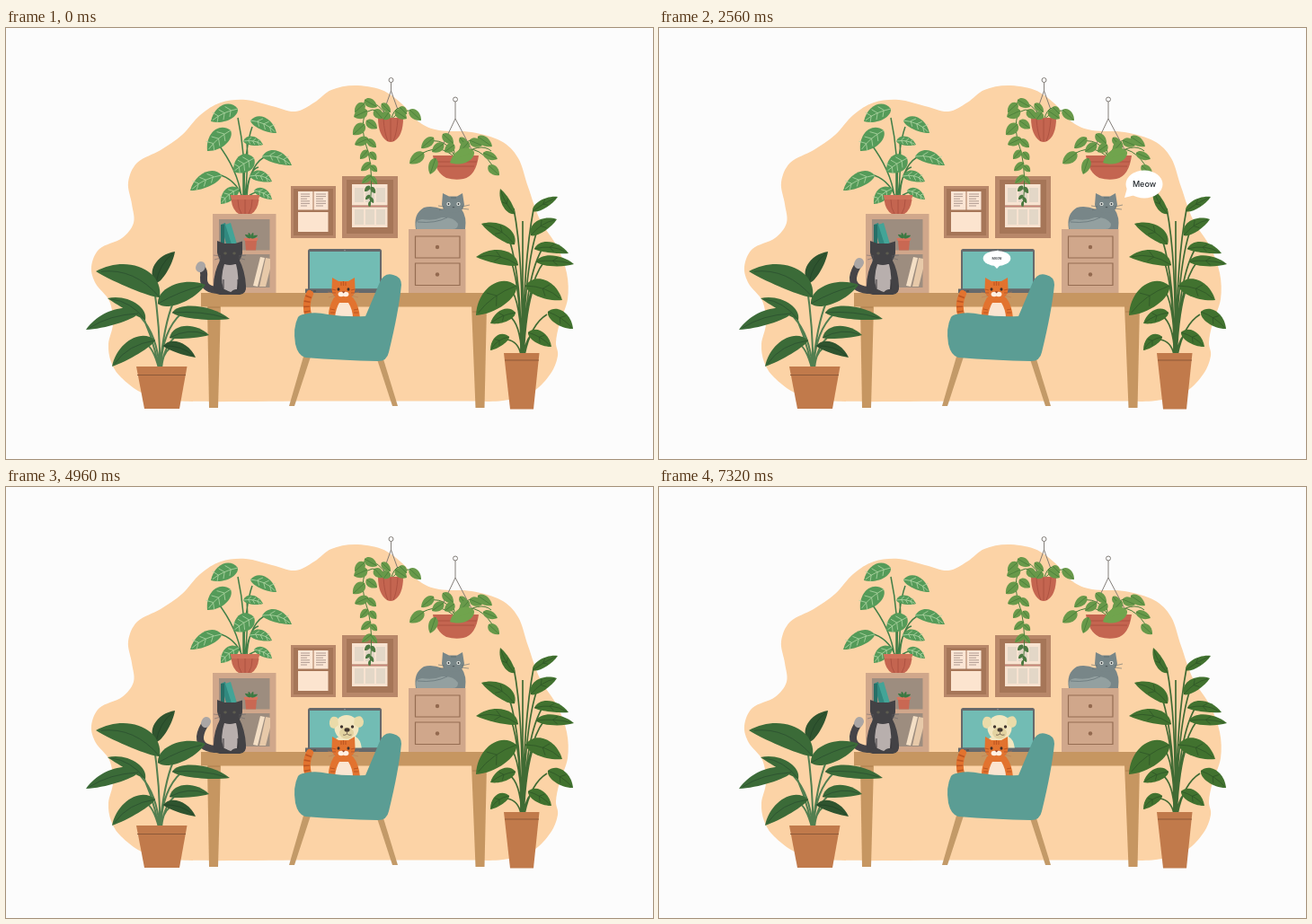
An HTML page with a canvas that plays this animation: 720x480 px, repeating every 8 s.

```html
<!DOCTYPE html>
<html lang="en">
<head>
<meta charset="utf-8">
<title>Cats at the desk</title>
<style>
html, body { margin: 0; width: 100%; height: 100%; overflow: hidden; background: #fcfcfc; }
canvas { display: block; }
</style>
</head>
<body>
<canvas id="stage" width="720" height="480"></canvas>
<script>
const ctx = document.getElementById('stage').getContext('2d');
const LOOP = 8000;
const clamp = v => Math.max(0, Math.min(1, v));
const mix = (a, b, k) => a + (b - a) * k;
const easeInOut = p => p * p * (3 - 2 * p);
const backOut = p => 1 + 2.70158 * (p - 1) ** 3 + 1.70158 * (p - 1) ** 2;

function fill(d, color) {
  ctx.fillStyle = color;
  ctx.fill(new Path2D(d));
}
function line(d, color, width = 1) {
  ctx.strokeStyle = color;
  ctx.lineWidth = width;
  ctx.stroke(new Path2D(d));
}
function rect(x, y, w, h, color) {
  ctx.fillStyle = color;
  ctx.fillRect(x, y, w, h);
}
function oval(x, y, rx, ry, color, turn = 0) {
  ctx.fillStyle = color;
  ctx.beginPath();
  ctx.ellipse(x, y, rx, ry, turn, 0, 7);
  ctx.fill();
}

// Closed Catmull-Rom curve through points.
function smooth(points, color) {
  const n = points.length;
  const at = i => points[(i + n) % n];
  ctx.beginPath();
  ctx.moveTo(...at(0));
  for (let i = 0; i < n; i++) {
    const [a, b, c, d] = [at(i - 1), at(i), at(i + 1), at(i + 2)];
    ctx.bezierCurveTo(b[0] + (c[0] - a[0]) / 6, b[1] + (c[1] - a[1]) / 6,
      c[0] - (d[0] - b[0]) / 6, c[1] - (d[1] - b[1]) / 6, c[0], c[1]);
  }
  ctx.fillStyle = color;
  ctx.fill();
}

// Leaf from base to tip; w is the half width, bend bows it sideways.
function leaf([x0, y0, x1, y1, w, bend = 0], color, vein, ribs = 0) {
  const dx = x1 - x0, dy = y1 - y0, len = Math.hypot(dx, dy);
  const at = (along, side) =>
    [x0 + dx * along - dy / len * side, y0 + dy * along + dx / len * side];
  const edge = 1.33;
  ctx.beginPath();
  ctx.moveTo(x0, y0);
  ctx.bezierCurveTo(...at(.1, (bend + w) * edge), ...at(.68, (bend + w) * edge), x1, y1);
  ctx.bezierCurveTo(...at(.68, (bend - w) * edge), ...at(.1, (bend - w) * edge), x0, y0);
  ctx.fillStyle = color;
  ctx.fill();
  ctx.beginPath();
  ctx.moveTo(x0, y0);
  ctx.quadraticCurveTo(...at(.5, bend * 2), ...at(.93, bend * .2));
  for (let i = 1; i <= ribs; i++) {
    const p = i / (ribs + 1.3);
    for (const s of [-1, 1]) {
      ctx.moveTo(...at(p, bend));
      ctx.lineTo(...at(p + .13, bend + s * w * .7));
    }
  }
  ctx.strokeStyle = vein;
  ctx.lineWidth = .8;
  ctx.stroke();
}
const leaves = (rows, color, vein, ribs) => rows.forEach(r => leaf(r, color, vein, ribs));

function backdrop() {
  rect(0, 0, 720, 480, '#fcfcfc');
  smooth([[95, 266], [104, 246], [129, 234], [142, 217], [140, 196], [136, 172], [146, 150],
    [172, 136], [196, 119], [216, 97], [239, 83], [267, 80], [296, 87], [322, 93], [343, 83],
    [362, 69], [388, 64], [418, 69], [440, 84], [460, 105], [482, 114], [518, 116], [551, 126],
    [570, 145], [581, 177], [594, 213], [613, 243], [624, 273], [625, 302], [616, 329],
    [612, 350], [614, 365], [606, 385], [586, 405], [553, 415], [500, 415.5], [350, 415.5],
    [190, 415.5], [153, 407], [128, 389], [117, 372], [114, 352], [119, 329], [115, 304],
    [100, 285]], '#fcd3a6');
}

function pictures() {
  rect(317, 176, 50, 58, '#b88769');
  rect(320, 179, 44, 52, '#a67658');
  rect(325, 182, 16.5, 20.5, '#fbe6d5');
  rect(342.5, 182, 16, 20.5, '#fbe6d5');
  rect(325, 205, 33.5, 22, '#fce4cf');
  for (let i = 0; i < 6; i++) {
    const y = 185 + i * 2.6, short = i % 3 == 2 ? 3 : 0;
    line(`M328 ${y}h${10 - short}M345 ${y}h${11 - short}`, '#9d8a80', .8);
  }
  rect(374, 165, 62, 69, '#b88769');
  rect(379, 169, 52, 60, '#a67658');
  rect(385, 174, 39.5, 23.5, '#f8e3d1');
  rect(385, 199.5, 39.5, 22.5, '#f8e3d1');
  line('M385 198.5h40', '#c9837a', 1);
  for (let i = 0; i < 3; i++) {
    rect(388 + i * 12, 178, 10, 16, '#e3d7c7');
    rect(388 + i * 12, 202, 10, 17, '#e3d7c7');
  }
}

function furniture() {
  rect(230, 207, 70.5, 88, '#d0a78b');
  rect(237, 213, 56.5, 34.5, '#9d8d7f');
  rect(237, 252, 56.5, 37, '#9d8d7f');
  fill('M239 219l5-2 9 28-6 2z', '#31897f');
  fill('M244 219l6-2 8 27-5 3z', '#43a497');
  rect(239, 219, 4, 28, '#287067');
  fill('M264.5 234h16l-1 3h-14z', '#d9735c');
  fill('M266 237h13l-1 10.500h-11z', '#c96853');
  leaves([[272, 234, 266, 230, 1.5], [272, 234, 270, 228, 1.5], [273, 234, 275, 228, 1.5],
    [273, 234, 280, 231, 1.5]], '#3d7943', '#3d7943');
  fill('M283 255l5 1-8 32-5-1z', '#f4dfc5');
  fill('M289 256l5 1v11l-5 20h-7z', '#e7c9a9');

  rect(448, 224, 63.5, 71, '#d0a78b');
  line('M455.500 232h49.500v24h-49.500zM455.500 262h49.500v24.500h-49.500z', '#966d52', 1.2);
  oval(480, 244, 2.2, 2.2, '#93694f');
  oval(480, 274.500, 2.2, 2.2, '#93694f');
}

function desk() {
  fill('M224 309h15l-3 114h-10z', '#c69661');
  fill('M518 309h17l-2.500 114h-10z', '#c69661');
  rect(217, 295, 319, 15.500, '#c69661');
  line('M225 311h13M519 316h15', '#ad7f4d', 1);
}

function laptop() {
  ctx.fillStyle = '#66696b';
  ctx.beginPath();
  ctx.roundRect(336, 246, 82, 47, 2.500);
  ctx.fill();
  rect(338, 249, 78, 41.500, '#72bcb4');
  oval(377, 247.600, .6, .6, '#b4bcbc');
  rect(333, 290.500, 85, 4.500, '#66696b');
  line('M336 293h5M342 293h3', '#404445', 1);
}

function dog(rise) {
  if (rise <= 0) return;
  ctx.save();
  ctx.beginPath();
  ctx.rect(338, 249, 78, 41.500);
  ctx.clip();
  ctx.translate(0, mix(40, 0, rise));
  const coat = '#f3e6bf';
  fill('M363 292Q364 280 371 278h18Q395 281 396 292z', coat);
  oval(379, 268, 13.500, 14, coat);
  fill('M369 257Q362 253 360 261Q359 268 365 269L370 265z', '#eadba9');
  fill('M388 257Q396 252 398 261Q398 268 392 268L387 264z', '#eadba9');
  oval(379, 274, 8, 6.500, '#e3d3a1');
  oval(373.500, 267, 1.700, 1.700, '#42372f');
  oval(385.500, 267, 1.700, 1.700, '#42372f');
  oval(379.500, 270.500, 3, 2.200, '#42372f');
  line('M379.500 272v3M375 276q2 1 4.500-1q2 2 5 1', '#6d5a48', .8);
  ctx.restore();
}

function blackCat(t) {
  const k = 1 - easeInOut(clamp(t / 840));
  const tipX = mix(223, 217, k), tipY = mix(262, 266, k), side = mix(213, 217, k);
  ctx.lineCap = 'round';
  line(`M240 292Q${side + 2} 293 ${side + 3} 278Q${side + 4} 270 ${tipX} ${tipY}`, '#464548', 8);
  line(`M${tipX - 1} ${tipY + 1}L${tipX} ${tipY - 1}`, '#aaa6a5', 10);
  ctx.lineCap = 'butt';
  fill('M239 257Q231 272 231 287Q230 296 238 297H260Q268 296 267 287Q266 270 259 257z', '#434245');
  fill('M243 263H256Q260 278 257 291L250 294L242 291Q238 278 243 263z', '#b8afad');
  fill('M235 250L235 237L243 240H255L263 237.500L263 251Q260 264 249 264Q238 264 235 250z', '#434245');
  line('M242 293v-13M258 293v-13', '#343336', 1);
  oval(241, 294, 6, 3, '#434245');
  oval(257, 294, 6, 3, '#434245');
  oval(244, 251, 1.800, 1.400, '#5c5b4f');
  oval(254, 251, 1.800, 1.400, '#5c5b4f');
  line('M239 254l-8-1M239 256l-7 2M259 254l8-1M259 256l7 2', '#666366', .5);
}

function greyCat() {
  fill('M456 224Q453 207 465 200Q474 197 486 202L507 202Q513 210 511 224z', '#788688');
  fill('M457 224Q454 214 463 213Q476 215 485 211Q498 210 503 218Q503 224 497 224z', '#93a0a0');
  line('M458 216Q478 218 491 211', '#68777a', .8);
  fill('M485 197L486 184L493 187.500H502L508 184L510 197Q508 206 498 206Q487 206 485 197z', '#788688');
  for (const x of [492.500, 503.500]) {
    oval(x, 196, 2.100, 1.900, '#f3f4ee');
    oval(x, 196, .9, 1.200, '#333c3e');
  }
  fill('M496.500 199h3l-1.500 1.500z', '#4b5557');
  line('M496 190v-2M498 190v-2M500 190v-2', '#5c6a6e', .8);
  line('M507 199l9-2M507 201l8 1M488 199l-7-1M488 201l-6 2', '#5f6c70', .6);
}

function orangeCat(t) {
  const q = t < 1720 ? Math.sin(Math.PI * t / 1720) ** 2 : 0;
  const x = mix(338, 331, q), y = mix(296, 298, q);
  const tail = `M337 322Q${mix(332, 328, q)} 308 ${x} ${y}`;
  ctx.lineCap = 'round';
  line(tail, '#e2732f', 8);
  ctx.lineCap = 'butt';
  ctx.setLineDash([1.600, 4]);
  line(tail, '#bd5521', 7);
  ctx.setLineDash([]);
  fill('M365 300Q358 312 359 323H394Q393 309 386 300z', '#e2732f');
  fill('M371 306H381Q386 314 386 323H366Q367 312 371 306z', '#fbe5d1');
  line('M361 313l5 1M361 317l5 0M392 313l-5 1M392 317l-5 0', '#bd5521', 1.200);
  fill('M362.500 291L363 278L370 282H381L388 278L388.500 291Q387 303 375.500 303Q364 303 362.500 291z', '#e2732f');
  line('M373 283v4M375.500 282v5M378 283v4M363 291l4 1M363 295l4 0M388 291l-4 1M388 295l-4 0', '#bd5521', 1.100);
  oval(373, 296.500, 3.400, 2.700, '#fff0e3');
  oval(378, 296.500, 3.400, 2.700, '#fff0e3');
  oval(370, 291, 1.500, 1.700, '#3c302a');
  oval(381, 291, 1.500, 1.700, '#3c302a');
  fill('M373.800 293.500h3.600l-1.800 2z', '#8f3e27');
  line('M367 296l-9-2M367 298l-8 2M384 296l9-2M384 298l8 2', '#bd7950', .5);
}

function chair() {
  fill('M331 366h8l-18 55h-6z', '#c39a68');
  fill('M413 369h7l16 52h-6z', '#c39a68');
  fill('M333 318.500Q344 316 358 319Q378 322 400 321Q406 307 416 283Q421 272 431 275Q440 277 440 286Q437 316 426 361Q424 371 414 371Q372 370 333 367Q325 365 322 352Q319 334 325 322Q327 319 333 318.500z', '#5b9d94');
}

function monstera() {
  const stem = '#417f47';
  line('M265 188Q267 142 258 100M264 188Q266 132 274 110M266 188Q273 148 290 143M262 188Q258 158 235 128M263 188Q255 168 236 163M268 188Q270 157 281 155M269 188Q278 180 287 184M264 188v-35M266 188Q270 152 268 125', stem, 1.500);
  leaves([[258, 90, 228, 104, 9, 2], [272, 103, 301, 117, 7, -3], [250, 114, 224, 137, 10, 2],
    [264, 126, 286, 130, 5, -2], [285, 143, 318, 153, 7, -4], [240, 164, 205, 181, 8, 3],
    [276, 145, 253, 160, 10, 1], [271, 165, 296, 171, 6, -3], [259, 179, 239, 196, 7, 2],
    [276, 181, 296, 191, 5, -2]], '#559b59', '#b3d7a6', 3);
  fill('M249.500 186H282.500L281 191H251z', '#d07259');
  fill('M250.500 191H281.500Q280 203 273 207H259Q252 203 250.500 191z', '#c46550');
  line('M258 191q0 10 4 16M266 191v16M274 191q0 10-4 16', '#a94e3e', .8);
}

function hangingPlants() {
  const wire = '#77716b', green = '#68994a', vein = '#477b38';
  line('M428.500 60V70L416 105M428.500 70L441 105', wire, .9);
  line('M500 82V101L483 137M500 101L519 137', wire, .9);
  ctx.fillStyle = '#fcfcfc';
  for (const [x, y] of [[428.500, 58], [500, 79.500]]) {
    ctx.beginPath();
    ctx.arc(x, y, 2.500, 0, 7);
    ctx.fill();
    ctx.stroke();
  }
  line('M427 103Q415 85 400 94Q393 112 403 138Q409 162 405 199M427 103Q443 87 455 94M426 103Q416 80 398 83M428 103q4-14 10-14', vein, 1);
  fill('M414 100H442Q442 120 432 126Q428 128 424 126Q414 119 414 100z', '#c46550');
  line('M420 101q1 16 5 25M428 101v25M436 101q-1 16-5 25', '#a94e3e', .8);
  leaves([[399, 80, 413, 88, 5], [402, 92, 387, 99, 6], [399, 84, 388, 94, 5],
    [410, 91, 419, 101, 5], [418, 84, 428, 94, 4], [433, 92, 446, 101, 5],
    [449, 91, 462, 103, 5], [438, 88, 446, 96, 4], [426, 94, 420, 102, 5],
    [399, 107, 386, 119, 6], [401, 103, 413, 112, 5], [403, 123, 388, 130, 5],
    [402, 124, 412, 133, 4], [403, 136, 394, 146, 4], [405, 138, 412, 147, 4],
    [406, 150, 395, 159, 4], [406, 153, 413, 160, 3.500], [407, 164, 396, 173, 3.500],
    [406, 165, 413, 174, 3]], green, vein);
  leaves([[405, 176, 399, 182, 2.500], [406, 177, 411, 184, 2.500], [405, 186, 400, 191, 2],
    [405, 188, 409, 195, 2], [405, 193, 404, 199, 1.500]], '#4d7844', vein);

  line('M500 145Q490 119 464 128M500 145Q483 126 457 143M500 145Q510 118 532 126M501 145Q520 122 542 154M499 145Q500 130 491 122M501 145Q528 126 540 137', vein, 1);
  fill('M475 142H526Q523 165 509 168Q500 170 490 167Q478 161 475 142z', '#c46550');
  line('M477 149H524M479 154H521', '#a94e3e', .9);
  leaves([[476, 122, 462, 134, 5], [465, 139, 449, 151, 6], [478, 145, 472, 163, 5],
    [486, 118, 498, 129, 5], [487, 129, 474, 138, 5], [505, 122, 514, 133, 4],
    [516, 125, 530, 131, 5], [525, 121, 541, 132, 5], [531, 139, 547, 146, 4.500],
    [537, 153, 549, 164, 5], [515, 127, 505, 138, 5], [499, 130, 488, 138, 5]], green, vein);
  leaf([521, 138, 494, 150, 8, 1], '#70a44d', '#70a44d');
}

function pot(d, rim) {
  fill(d, '#c17a4b');
  line(rim, '#8d5939', 1.200);
}

function leftPlant() {
  line('M171 379Q172 336 164 283M171 379Q168 342 150 322M171 379Q176 330 186 306M172 379Q174 337 195 318M173 379Q176 352 190 343M170 379Q164 356 155 351M173 379Q174 363 182 357M170 379Q163 340 146 309', '#527f50', 2);
  leaf([167, 284, 188, 249, 8, -4], '#2f542f', '#244428');
  leaf([175, 354, 211, 367, 6, -4], '#2f542f', '#244428');
  leaves([[171, 300, 100, 271, 13, 10], [169, 307, 222, 286, 11, -2],
    [155, 325, 113, 301, 6, 5], [147, 318, 89, 336, 8, 4],
    [185, 317, 249, 324, 7, -3], [182, 345, 226, 342, 7, -5],
    [166, 348, 118, 377, 9, 6]], '#3b6b38', '#2b5030');
  pot('M145 377H201.500L193 424H154z', 'M146 386.500H200');
}

function rightPlant() {
  const stem = '#406b34';
  line('M574 364Q576 258 565 201M575 364Q576 260 587 202M575 364Q578 263 591 226M573 364Q574 280 560 235M573 364Q573 291 562 259M576 364Q578 275 598 244M576 364Q578 287 599 260M574 364Q573 303 561 290M576 364Q579 311 587 290M574 364Q572 328 560 321M577 364Q584 330 602 319M576 364Q579 345 586 341M573 364Q570 349 558 347M575 364V215', stem, 1.700);
  leaves([[566, 207, 550, 179, 5, -2], [586, 204, 614, 188, 5, -1],
    [566, 241, 529, 218, 8, 4], [584, 231, 613, 213, 7, -3],
    [570, 264, 523, 255, 8, 5], [588, 246, 626, 251, 6, -4],
    [590, 260, 632, 263, 6, -2], [568, 287, 523, 320, 13, 4],
    [578, 287, 619, 303, 10, -4], [567, 317, 539, 329, 7, 2],
    [603, 316, 631, 335, 8, -2], [560, 344, 539, 359, 6, 3],
    [581, 339, 607, 355, 7, -2]], '#41722f', '#2f5628', 1);
  pot('M554 362H593.500L587 424.500H561z', 'M555 370H593');
}

function bubble(t, { start, end, x, y, rx, ry, tail, text, size, tx = 0 }) {
  if (t <= start || t >= end) return;
  const grow = from => backOut(clamp((t - from) / 400));
  const shrink = (from, span) => 1 - clamp((t - from) / span) ** 2;
  const body = t < end - 150 ? grow(start) : shrink(end - 150, 150);
  const word = t < start + 40 ? 0 :
    t < end - 240 ? grow(start + 40) : shrink(end - 240, 100);
  ctx.save();
  ctx.translate(x, y);
  ctx.save();
  ctx.scale(body, body);
  oval(0, 0, rx, ry, '#fff');
  fill(tail, '#fff');
  ctx.restore();
  if (word > 0) {
    ctx.scale(word, word);
    ctx.font = `500 ${size}px Inter, sans-serif`;
    ctx.textAlign = 'center';
    ctx.textBaseline = 'middle';
    ctx.fillStyle = '#252b30';
    ctx.fillText(text, tx, 0);
  }
  ctx.restore();
}

const bubbles = [
  { start: 320, end: 1680, x: 199.500, y: 225.500, rx: 24.500, ry: 18.500,
    tail: 'M13 14L27 18L22 6z', text: 'Meow', size: 9, tx: -.5 },
  { start: 1760, end: 3120, x: 540, y: 174, rx: 20.500, ry: 15.500,
    tail: 'M-19 4L-22 15L-10 12z', text: 'Meow', size: 9 },
  { start: 2480, end: 3840, x: 376, y: 256.500, rx: 21.500, ry: 12,
    tail: 'M-6 10L0 16L6 10z', text: 'Meow', size: 9 },
  { start: 5600, end: 7320, x: 378.500, y: 217.500, rx: 21.500, ry: 16,
    tail: 'M-6 13L0 20L6 13z', text: 'Woof!', size: 11, tx: 1 }
];

function draw(t) {
  backdrop();
  pictures();
  furniture();
  monstera();
  hangingPlants();
  desk();
  laptop();
  dog(backOut(clamp((t - 4200) / 400)));
  blackCat(t);
  greyCat();
  orangeCat(t);
  chair();
  leftPlant();
  rightPlant();
  bubbles.forEach(b => bubble(t, b));
}

const begin = performance.now();
function tick() {
  draw((performance.now() - begin) % LOOP);
  requestAnimationFrame(tick);
}
tick();
</script>
</body>
</html>
```
